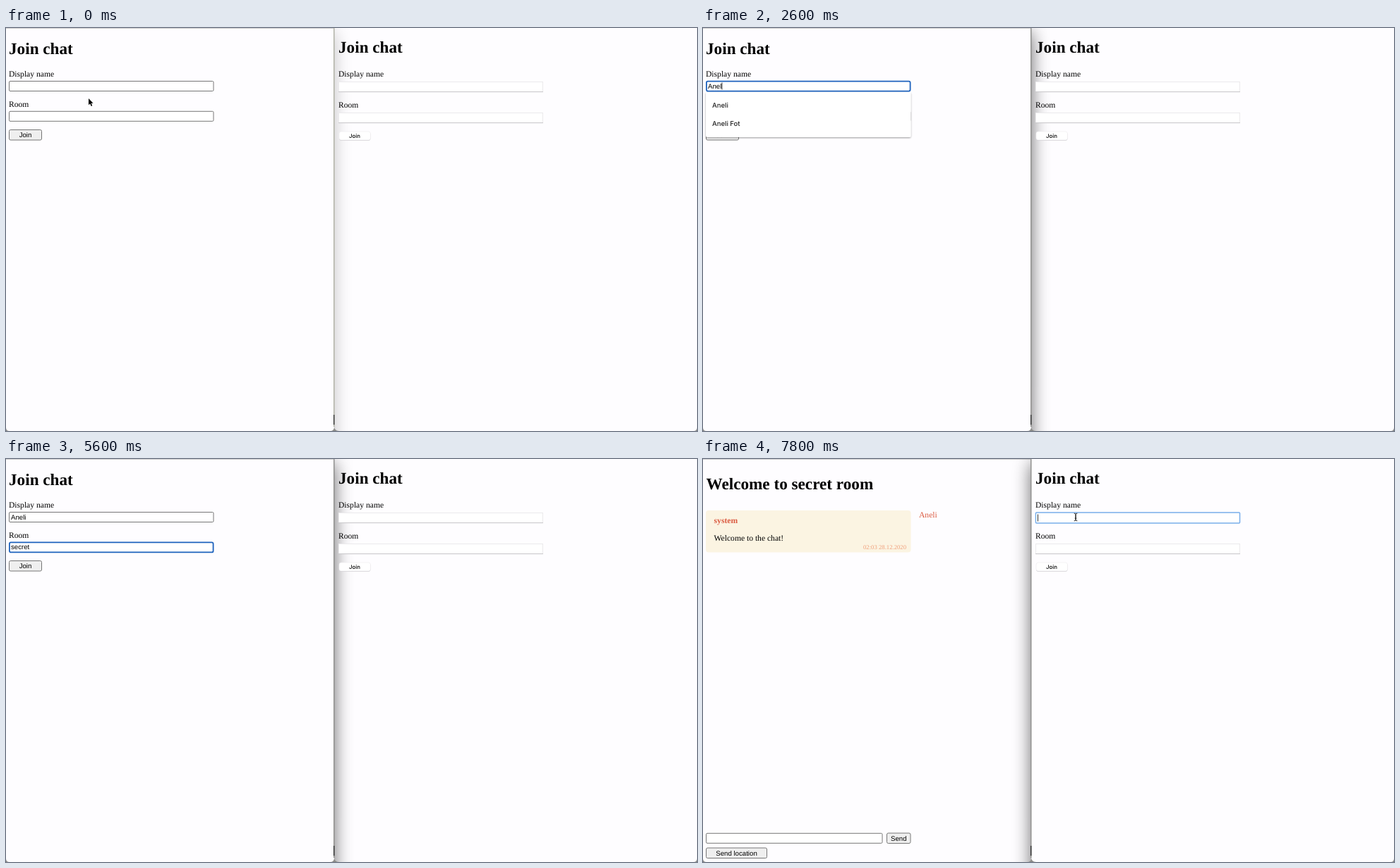
An HTML page that plays this animation: 979 by 572 pixels, repeating every 8000 ms.

```html
<!DOCTYPE html>
<html lang="en">
<head>
<meta charset="utf-8">
<title>Join chat</title>
<style>
  html, body { margin: 0; width: 100%; height: 100%; overflow: hidden; background: #fefdff; }
  svg { display: block; width: 979px; height: 572px; text-rendering: geometricPrecision; }
  text { white-space: pre; }
  .serif { font: 11.6px "Liberation Serif", serif; }
  .h1 { font: bold 23.2px "Liberation Serif", serif; }
  .bold { font-weight: bold; }
  .time { font-size: 8.7px; }
  .ui { font: 9.67px "Liberation Sans", sans-serif; }
  .list { font: 500 9.5px Inter, sans-serif; fill: #222; }
  .mac { font: 500 7.8px Inter, sans-serif; }
  .mid { text-anchor: middle; }
</style>
</head>
<body>
<svg viewBox="0 0 979 572">
  <defs>
    <filter id="blur" x="-20%" y="-20%" width="140%" height="140%"><feGaussianBlur stdDeviation="13"/></filter>
    <filter id="soft" x="-5%" y="-20%" width="110%" height="150%"><feDropShadow dx="0" dy="1" stdDeviation="1" flood-opacity=".4"/></filter>
    <clipPath id="leftWin"><path d="M0 0H465V566Q465 572 459 572H5Q0 572 0 567Z"/></clipPath>
    <clipPath id="rightWin"><path d="M465 0H979V567Q979 572 974 572H472Q465 572 465 565Z"/></clipPath>
  </defs>
  <g id="stage"></g>
</svg>
<script>
const LOOP = 8000, STEP = 200;
const USER = 'Aneli', ROOM = 'secret';
const USERS = ['Acorn Panel', USER, USER + ' Fot'];
const stage = document.getElementById('stage');
const pen = document.createElement('canvas').getContext('2d');
pen.font = '9.67px "Liberation Sans", sans-serif';

const count = (k, starts) => starts.filter(s => s <= k).length;
const within = (k, a, b) => k >= a && k <= b;

const text = (x, y, s, cls = 'serif', fill) =>
  `<text x="${x}" y="${y}" class="${cls}"${fill ? ` style="fill:${fill}"` : ''}>${s}</text>`;

const box = (x, y, w, h, fill, stroke, sw = 1, r = 1.5) =>
  `<rect x="${x + sw / 2}" y="${y + sw / 2}" width="${w - sw}" height="${h - sw}" rx="${r}" ` +
  `fill="${fill}" stroke="${stroke}" stroke-width="${sw}"/>`;

const bar = (x, y, w, h, fill, more = '') =>
  `<rect x="${x}" y="${y}" width="${w}" height="${h}" fill="${fill}" ${more}/>`;

function field(y, w, value, focus, caret) {
  const ring = focus ? box(4, y - .3, w, 15.8, '#fff', '#1d62bd', 1.8, 2)
                     : box(4, y, w, 15, '#fff', '#767676');
  const end = 7.2 + pen.measureText(value).width;
  return ring + text(7, y + 10.6, value, 'ui') + (caret ? bar(end, y + 2.5, .8, 10, '#000') : '');
}

const button = (x, y, w, label) =>
  box(x, y, w, 15.5, '#efefef', '#767676', 1, 2) + text(x + w / 2, y + 11, label, 'ui mid');

function dropdown(top, rows) {
  return bar(4, top, 290.5, 12 + 26 * rows.length, '#fff', 'rx="2" filter="url(#soft)"') +
    rows.map((row, i) => text(13, top + 22.4 + 26 * i, row, 'list')).join('');
}

function joinPage(k) {
  const name = USER.slice(0, count(k, [9, 11, 12, 13, 14]));
  const room = ROOM.slice(0, count(k, [18, 20, 22, 23, 24, 26]));
  return text(4, 37, 'Join chat', 'h1') +
    text(4, 69, 'Display name') +
    field(75, 290.5, name, within(k, 4, 15), within(k, 5, 6) || within(k, 9, 14)) +
    text(4, 111.5, 'Room') +
    field(117.8, 290.5, room, k >= 16, within(k, 16, 27)) +
    button(4, 144, 47, 'Join') +
    (within(k, 9, 14) ? dropdown(91, USERS.filter(u => u.startsWith(name))) : '') +
    (within(k, 18, 25) ? dropdown(133.6, [ROOM]) : '');
}

function chatPage(k) {
  const message = bar(4, 73, 290.5, 59.5, '#fbf4e2', 'rx="4"') +
    text(15.6, 90.5, 'system', 'serif bold', '#db5a40') +
    text(15.6, 115.5, 'Welcome to the chat!') +
    text(227, 128, '02:03 28.12.2020', 'serif time', '#f0a07c') +
    text(306, 83.3, USER, 'serif', '#db5a40');
  return text(4.5, 43, 'Welcome to secret room', 'h1') +
    (k >= 30 ? message : '') +
    field(530.8, 250.5, '', k < 38, within(k, 29, 30) || within(k, 33, 34)) +
    button(260, 530.5, 34.5, 'Send') +
    button(4, 551.5, 87, 'Send location');
}

function macField(y, focus) {
  if (focus) return box(470.7, y - .8, 290.6, 16.6, '#fff', '#78aeea', 1.5, 1);
  return box(471, y, 290, 15, '#fff', '#ebeaec', 1, 0) + bar(471, y + 14.2, 290, .9, '#c4c3c6');
}

function rightPage(k) {
  return text(471, 35, 'Join chat', 'h1') +
    text(471, 69, 'Display name') + macField(76, k >= 38) +
    (k >= 39 ? bar(474, 78.5, .8, 10, '#000') : '') +
    text(471, 113, 'Room') + macField(120) +
    bar(472, 147.8, 44.5, 12, '#c9c8cb', 'rx="3"') +
    bar(472, 147, 44.5, 12, '#fff', 'rx="3" stroke="#ecebee" stroke-width=".6"') +
    text(494, 155.8, 'Join', 'mac mid');
}

const arrow = (x, y) =>
  `<path transform="translate(${x} ${y})" d="M0 0V9.2L2.1 7.3L3.7 10.9L5.2 10.2L3.7 6.8H6.5Z" ` +
  `fill="#000" stroke="#fff" stroke-width="1.2" paint-order="stroke"/>`;

const beam = (x, y) =>
  `<path transform="translate(${x} ${y})" d="M-2.3 -5.3Q0 -5.3 0 -4V4Q0 5.3 -2.3 5.3M2.3 -5.3Q0 -5.3 0 -4V4Q0 5.3 2.3 5.3M-1.2 1.6H1.2" ` +
  `fill="none" stroke="#222" stroke-width="1"/>`;

function pointer(k) {
  if (k < 3) return arrow(117 - k * .5, 100 - k * 5);
  if (k < 9) return beam(115.5, 82.5);
  if (within(k, 33, 37)) {
    const p = Math.min(1, (k - 32) / 4), ease = p * (2 - p);
    return arrow(117 + 411.5 * ease, 90 - 9 * p);
  }
  return k >= 38 ? beam(528, 82.5) : '';
}

const shadow = (x, opacity) => bar(x, 6, 620, 680, '#000', `opacity="${opacity}" filter="url(#blur)"`);

function draw(k) {
  const rightActive = k >= 38;
  const depth = k < 4 ? .24 : k < 5 ? .45 : .6;
  stage.innerHTML =
    bar(0, 0, 979, 572, '#8b8b88') +
    `<g clip-path="url(#leftWin)">${bar(0, 0, 465, 572, '#fefdff')}${bar(0, 0, 465, 1, '#cfcecf')}` +
    (k < 29 ? joinPage(k) : chatPage(k)) + (rightActive ? shadow(465, .6) : '') + '</g>' +
    `<g clip-path="url(#rightWin)">${bar(465, 0, 514, 572, '#fefdff')}` +
    (rightActive ? '' : shadow(-155, depth)) + rightPage(k) + '</g>' +
    bar(464, 0, 1.5, 566, k < 4 ? '#b2b3a8' : '#929290') +
    bar(464, 549, 1.3, 14, '#2a2a2a') +
    pointer(k);
}

let shown = -1;
function tick() {
  const k = Math.floor(performance.now() % LOOP / STEP);
  if (k !== shown) draw(shown = k);
  requestAnimationFrame(tick);
}
tick();
</script>
</body>
</html>
```
